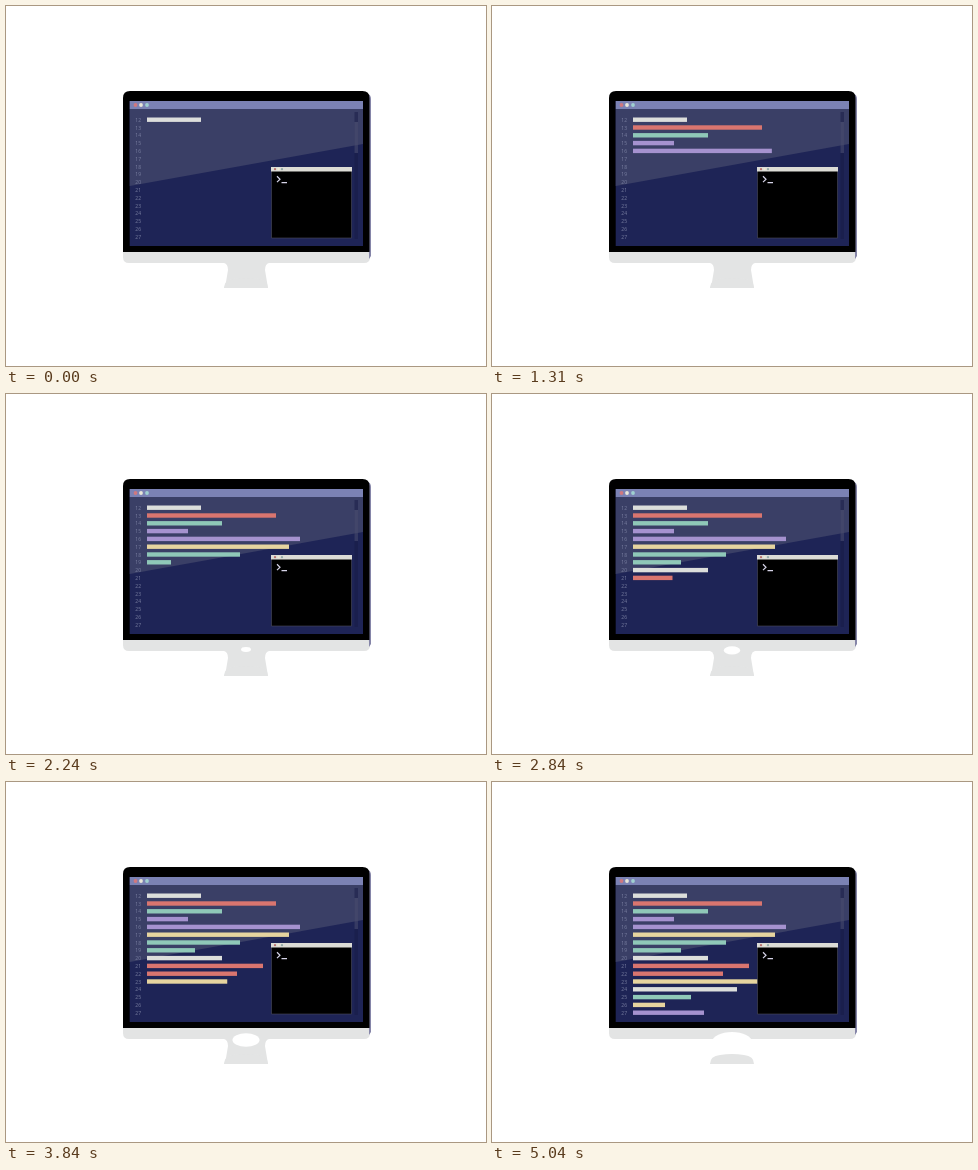
An HTML page for the animation above (5.14 s loop, 480 by 360 pixels).

```html
<!DOCTYPE html>
<html lang="en">
<head>
<meta charset="utf-8">
<title>Typing code</title>
<style>
  html, body { margin: 0; width: 100%; height: 100%; overflow: hidden; background: #fff; }
  svg { display: block; width: 480px; height: 360px; }
  text { font: 5px "Open Sans", sans-serif; fill: #7b80a2; text-anchor: end; }
</style>
</head>
<body>
<svg viewBox="0 0 480 360">
  <!-- monitor and stand -->
  <g fill="#e3e4e4">
    <path id="neck" d="M218 257Q222 258 222 264L220 276L218 282H262L259 264Q259 258 263 257Z"/>
    <path d="M117 245H364V251Q364 257 358 257H123Q117 257 117 251Z"/>
  </g>
  <ellipse id="hole" cx="240" fill="#fff"/>
  <path d="M218 282Q218 274 228 273Q240 271 252 273Q262 274 262 282Z" fill="#e3e4e4"/>
  <path d="M362 88Q365 89 365 93V250L363 253Z" fill="#8585a8"/>
  <path d="M117 246V92Q117 85 124 85H356.500Q363.500 85 363.500 92V246Z"/>

  <!-- editor -->
  <path d="M123.700 95H357V240H123.700Z" fill="#1e2456"/>
  <path d="M123.700 103H357V138L123.700 180Z" fill="#3a3f66"/>
  <path d="M123.700 95H357V103H123.700Z" fill="#7b82b4"/>
  <circle cx="129.500" cy="99" r="1.900" fill="#d0787f"/>
  <circle cx="135" cy="99" r="1.900" fill="#e8e6d8"/>
  <circle cx="141" cy="99" r="1.900" fill="#9fd0d0"/>
  <path d="M348.500 106H352V233H348.500Z" fill="#161b45" opacity=".5"/>
  <path d="M348.500 116H352V147H348.500Z" fill="#fff" opacity=".12"/>
  <g id="rows"></g>

  <!-- terminal -->
  <path d="M265.500 163V232H345.500V163Z" stroke="#4a4c5c" stroke-width=".6"/>
  <path d="M265 161H346V165.500H265Z" fill="#dcdcd6"/>
  <circle cx="269" cy="163.200" r="1.100" fill="#b9716c"/>
  <circle cx="272.500" cy="163.200" r="1.100" fill="#eee9d2"/>
  <circle cx="276" cy="163.200" r="1.100" fill="#92aaa6"/>
  <path d="M271 170.300L274 173.200L271 176.100M275.500 176.700H281" fill="none" stroke="#d6d4e8" stroke-width="1.200"/>
</svg>
<script>
const LOOP = 5140, SLOW_FROM = 1840, NECK_GONE = 4840;
const HOLE_START = 1310, HOLE_END = 5040;
const white = "#dcdedb", red = "#d9756f", green = "#8fc8b8", purple = "#a592cf", yellow = "#e6d49f";

// length and colour of each code line
const lines = [
  [54, white], [129, red], [75, green], [41, purple],
  [153, purple], [142, yellow], [93, green], [48, green],
  [75, white], [116, red], [90, red], [140, yellow],
  [104, white], [58, green], [32, yellow], [71, purple]
];

// time and total length typed by then
const typing = [[0, 54], [2240, 711], [3440, 988], [5040, 1421]];

const byId = id => document.getElementById(id);
const clamp = (v, min, max) => Math.max(min, Math.min(max, v));

function set(el, attrs) {
  for (const name in attrs) el.setAttribute(name, attrs[name]);
}

function addToRows(tag, attrs) {
  const el = document.createElementNS("http://www.w3.org/2000/svg", tag);
  set(el, attrs);
  return byId("rows").appendChild(el);
}

const bars = lines.map(([, fill], i) => {
  const y = 113.7 + i * 7.8;
  addToRows("text", { x: 135, y: y + 2 }).textContent = 12 + i;
  return addToRows("rect", { x: 141, y: y - 2.2, height: 4.4, fill });
});

// the picture advances in short steps first, then in longer ones
function stepped(t) {
  const [start, step] = t < SLOW_FROM ? [0, 56.9] : [SLOW_FROM, 100];
  return start + Math.floor((t - start) / step) * step;
}

function typedAt(t) {
  const next = Math.max(1, typing.findIndex(([time]) => time >= t));
  const [t0, from] = typing[next - 1], [t1, to] = typing[next];
  return from + (to - from) * (t - t0) / (t1 - t0);
}

function draw(now) {
  const t = stepped(now % LOOP);
  let left = typedAt(t);
  lines.forEach(([length], i) => {
    set(bars[i], { width: clamp(left, 0, length) });
    left -= length;
  });
  const grown = clamp((t - HOLE_START) / (HOLE_END - HOLE_START), 0, 1);
  set(byId("hole"), { cy: 254 + 6 * grown, rx: 20 * grown, ry: 10 * grown });
  set(byId("neck"), { visibility: t < NECK_GONE ? "visible" : "hidden" });
}

const begin = performance.now();
function tick() {
  draw(performance.now() - begin);
  requestAnimationFrame(tick);
}
tick();
</script>
</body>
</html>
```
